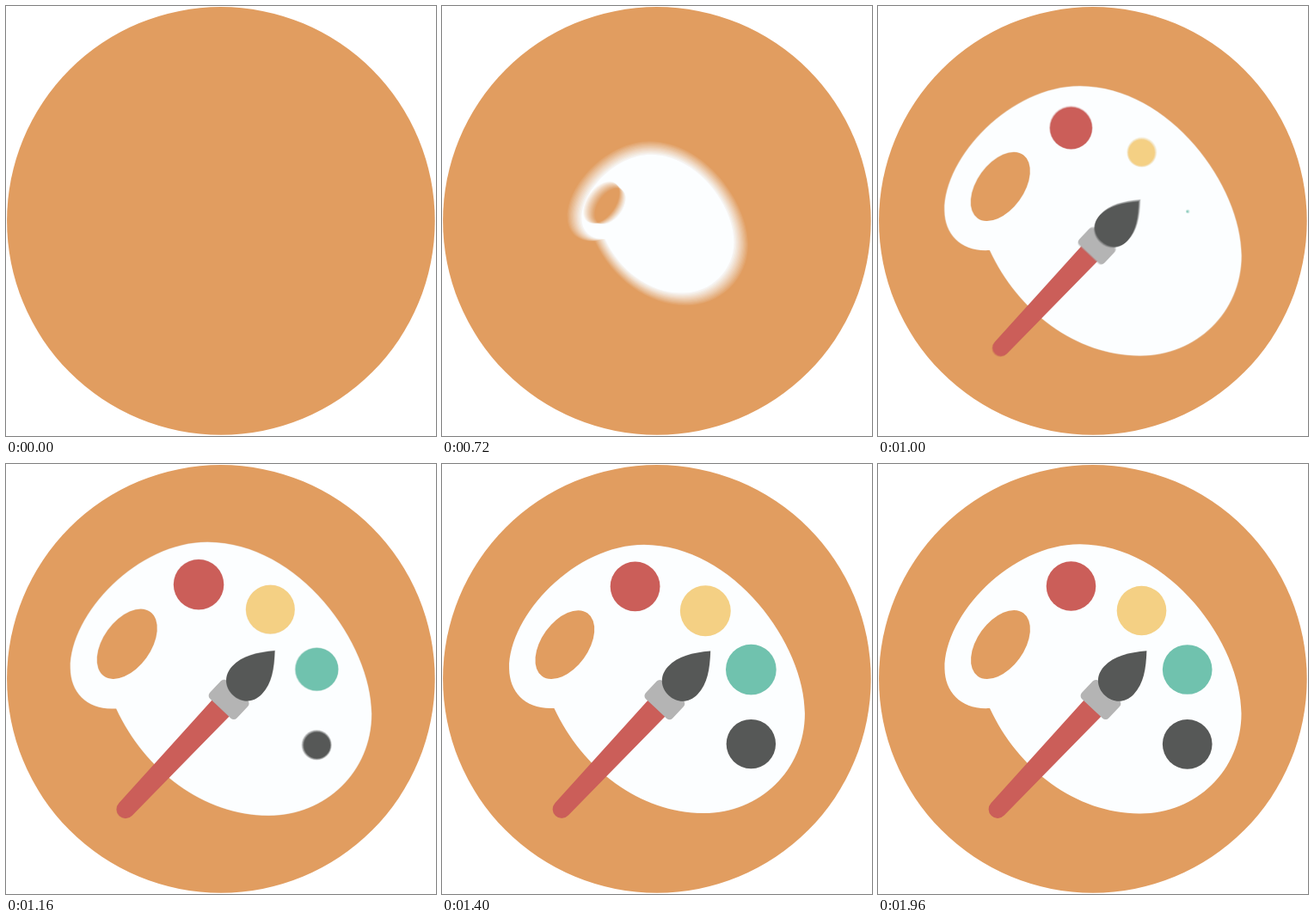
An HTML page with a canvas that plays this animation: 500x500 px, repeating every 2000 ms.

```html
<!DOCTYPE html>
<html lang="en">
<head>
<meta charset="utf-8">
<title>Paint palette</title>
<style>
  html, body { margin: 0; width: 100%; height: 100%; overflow: hidden; background: #fff; }
  canvas { display: block; width: 500px; height: 500px; }
</style>
</head>
<body>
<canvas id="stage" width="500" height="500"></canvas>
<script>
const LOOP = 2000, STEP = 40, SHUTTER = 10, SAMPLES = 14;
const COLORS = {
  disc: '#e19d60', board: '#fcfeff', red: '#cb5e59', yellow: '#f4d084',
  green: '#70c2ae', dark: '#565857', metal: '#b4b4b4'
};

const stage = document.getElementById('stage').getContext('2d');
const buffer = document.createElement('canvas');
buffer.width = buffer.height = 500;
const g = buffer.getContext('2d');

const board = new Path2D(
  'M130 284 C97 286 78 266 77.5 238 C77 175 155 93 235 93.3 ' +
  'C340 94 422.5 210 422.5 290 C422.5 357 369 407 304 406.5 ' +
  'C230 406 163 355 130 284Z');
const hole = new Path2D();
hole.ellipse(142.5, 210, 27.2, 45.3, 0.625, 0, Math.PI * 2);
board.addPath(hole);

// The brush stands upright around the centre of its metal band.
const handle = new Path2D('M-13.8 10 L13.8 10 L10.5 175 A10.5 10.5 0 0 1 -10.5 175Z');
const band = new Path2D();
band.roundRect(-21.5, -14.3, 43, 28.6, 5);
const tip = new Path2D('M0 -78 C14 -62 23.6 -48 23.6 -31 C23.6 -16 13 -7 0 -7 ' +
  'C-13 -7 -23.6 -16 -23.6 -31 C-23.6 -48 -14 -62 0 -78Z');

const dots = [
  { x: 224.5, y: 142, color: COLORS.red, start: 840 },
  { x: 306.5, y: 170.5, color: COLORS.yellow, start: 920 },
  { x: 359.7, y: 239, color: COLORS.green, start: 1000 },
  { x: 359.7, y: 325.8, color: COLORS.dark, start: 1080 }
];

// Fast ease-out to full size, then a damped wobble.
function pop(ms) {
  const t = ms / 1000, end = 0.36;
  if (t <= 0) return 0;
  if (t < end) return 1 - Math.pow(1 - t / end, 3.3);
  const after = t - end;
  return 1 + 0.052 * Math.sin(after * 2.2 * Math.PI * 2) * Math.exp(-6 * after);
}

// Size at one moment of the shutter; it never opens before the part appears.
function sizeAt(time, start, shutter) {
  const age = time - start;
  if (age < 0) return 0;
  const from = Math.max(0, age - SHUTTER);
  return pop(from + (age + SHUTTER - from) * shutter);
}

function scaleAbout(x, y, s) {
  g.translate(x, y);
  g.scale(s, s);
  g.translate(-x, -y);
}

function fill(path, color, rule = 'nonzero') {
  g.fillStyle = color;
  g.fill(path, rule);
}

function circle(x, y, r, color) {
  g.beginPath();
  g.arc(x, y, r, 0, Math.PI * 2);
  g.fillStyle = color;
  g.fill();
}

function drawScene(time, shutter) {
  g.fillStyle = '#fff';
  g.fillRect(0, 0, 500, 500);
  circle(249.9, 249.9, 248.8, COLORS.disc);

  const boardSize = sizeAt(time, 640, shutter);
  if (boardSize > 0) {
    g.save();
    scaleAbout(252, 257, boardSize);
    fill(board, COLORS.board, 'evenodd');
    for (const d of dots) {
      const size = sizeAt(time, d.start, shutter);
      if (size > 0) circle(d.x, d.y, 28.8 * size, d.color);
    }
    g.restore();
  }

  const brushSize = sizeAt(time, 800, shutter);
  if (brushSize > 0) {
    g.save();
    scaleAbout(193, 345, brushSize);
    g.translate(259, 274);
    g.rotate(0.755);
    fill(handle, COLORS.red);
    fill(band, COLORS.metal);
    fill(tip, COLORS.dark);
    g.restore();
  }
}

// Running average of several moments gives the motion blur.
function render(time) {
  const count = time < 640 ? 1 : SAMPLES;
  for (let i = 0; i < count; i++) {
    drawScene(time, (i + 0.5) / count);
    stage.globalAlpha = 1 / (i + 1);
    stage.drawImage(buffer, 0, 0);
  }
}

let shown = -1;
function tick() {
  const time = Math.floor((performance.now() - begin) % LOOP / STEP) * STEP;
  if (time !== shown) render(shown = time);
  requestAnimationFrame(tick);
}
const begin = performance.now();
tick();
</script>
</body>
</html>
```
